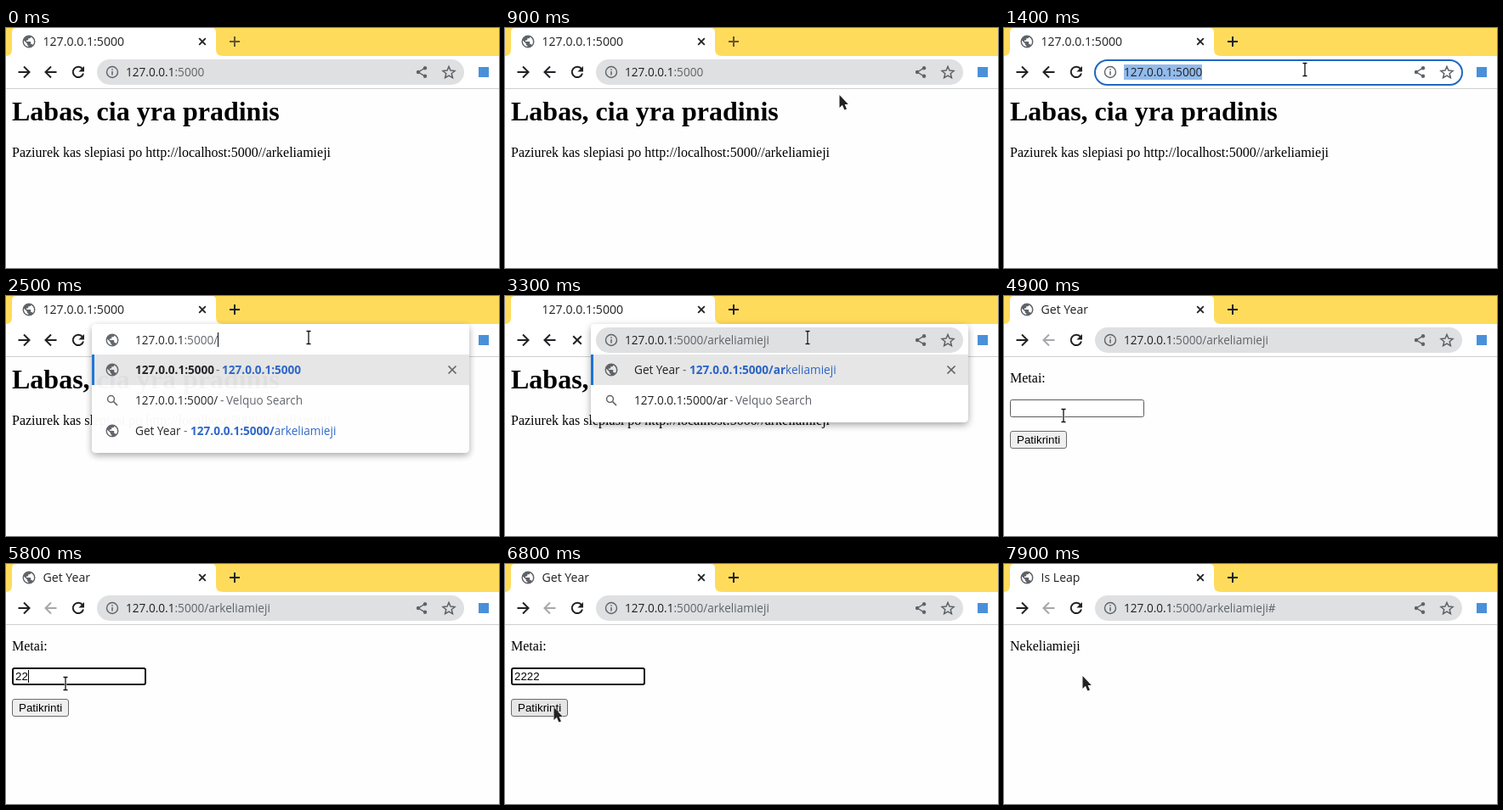
These frames come from a looping animation (580x283 px, 8 s). An HTML page:

```html
<!DOCTYPE html>
<html lang="lt">
<head>
<meta charset="utf-8">
<title>Keliamieji metai</title>
<style>
  html, body { margin: 0; width: 100%; height: 100%; overflow: hidden; background: #fefefe; }
  svg { display: block; width: 580px; height: 283px; }
  text { white-space: pre; }
  .ui { font: 13.6px "Open Sans", "Noto Sans", sans-serif; }
  .tab { font-size: 14.1px; }
  .bold { font-weight: 700; }
  .page { font: 16px "Liberation Serif", serif; fill: #000; }
  .head { font-size: 32px; font-weight: 700; }
  .form { font: 13.333px "Liberation Sans", Arial, sans-serif; fill: #000; }
</style>
</head>
<body>
<svg id="stage" viewBox="0 0 580 283" xmlns="http://www.w3.org/2000/svg"></svg>
<script>
const LOOP = 8000, STEP = 100;
const DARK = '#202124', GREY = '#5f6368', BLUE = '#2a64c5', SELECTED = '#92bbec';
const HOST = '127.0.0.1', PORT = ':5000', ADDRESS = HOST + PORT;

// Pointer stops: time, x, y
const POINTER = [
  [500, 471, 125], [1100, 354, 56], [1300, 354, 52], [1400, 354, 49], [1600, 356, 49],
  [3900, 356, 49], [4100, 251, 76], [4200, 251, 76], [4400, 83, 122], [4500, 83, 122],
  [4600, 58, 155], [4700, 58, 155], [4900, 70, 141], [6300, 70, 141], [6400, 70, 146],
  [6500, 70, 146], [6600, 57, 169], [7700, 57, 169], [7900, 92, 132]
];

const within = (t, from, to) => t >= from && t < to;
const rect = (x, y, w, h, fill, more = '') =>
  `<rect x="${x}" y="${y}" width="${w}" height="${h}" fill="${fill}" ${more}/>`;
const line = (d, color = DARK, width = 2, more = '') =>
  `<path d="${d}" fill="none" stroke="${color}" stroke-width="${width}" ${more}/>`;
const text = (x, y, content, cls = 'ui', fill = '') =>
  `<text x="${x}" y="${y}" class="${cls}"${fill && ` fill="${fill}"`}>${content}</text>`;
const span = (content, fill, bold, x) =>
  `<tspan fill="${fill}"${bold ? ' class="bold"' : ''}${x ? ` x="${x}"` : ''}>${content}</tspan>`;
const caret = (x, y, h) => rect(x, y, 1, h, '#000');

const globe = (x, y) => `<path transform="translate(${x - 9} ${y - 9}) scale(.75)" fill="${GREY}"
  d="M12 2a10 10 0 1 0 0 20a10 10 0 0 0 0-20zm-1 17.9c-4-.5-7-3.9-7-7.9 0-.6.1-1.2.2-1.8L9 15v1a2 2 0 0 0 2 2zm6.9-2.5a2 2 0 0 0-1.9-1.4h-1v-3a1 1 0 0 0-1-1H8v-2h2a1 1 0 0 0 1-1V7h2a2 2 0 0 0 2-2v-.4a8 8 0 0 1 2.9 12.8z"/>`;
const cross = (x, y, r, color = DARK, width = 1.8) =>
  line(`M${x - r} ${y - r}l${2 * r} ${2 * r}m0 ${-2 * r}l${-2 * r} ${2 * r}`, color, width);
const arrow = (x, dir, color) =>
  line(`M${x - 6.5 * dir} 52h${13 * dir}M${x} 45.5l${-6.5 * dir} 6.5l${6.5 * dir} 6.5`, color);
const lens = (x, y) => `<circle cx="${x - 1.5}" cy="${y - 1.5}" r="3.9" fill="none" stroke="${GREY}" stroke-width="1.5"/>`
  + line(`M${x + 1.5} ${y + 1.5}l4.5 4.5`, GREY, 1.7);
const info = () => `<circle cx="125" cy="52" r="6.5" fill="none" stroke="${GREY}" stroke-width="1.4"/>`
  + line('M125 51v4.5M125 48.2v1.5', GREY, 1.5);
const reload = () => line('M90 48.2A6.2 6.2 0 1 0 91 53.5')
  + `<path d="M92 45v6.6h-6.6z" fill="${DARK}"/>`;

const barIcons = () =>
  line('M493 47.2L485 52l8 4.8', GREY, 1.4)
  + [[493, 47.2], [485, 52], [493, 56.8]].map(([x, y]) =>
    `<circle cx="${x}" cy="${y}" r="2.2" fill="${GREY}"/>`).join('')
  + line('M521 45.5l2 4.6 5 .4-3.8 3.3 1.2 4.9-4.4-2.6-4.4 2.6 1.2-4.9-3.8-3.3 5-.4z', GREY, 1.5);

const pill = () => rect(107, 37, 432, 30, '#dee0e2', 'rx="15"');

const addressText = (x, path = '') =>
  `<text x="${x}" y="57" class="ui">${span(HOST, DARK)}${span(PORT + path, GREY)}</text>`;

function frame(t, view) {
  const focused = t >= 1300;
  const title = view === 'home' ? ADDRESS : view === 'form' ? 'Get Year' : 'Is Leap';
  const loading = within(t, 3300, 3500) || within(t, 7200, 7500);
  return rect(0, 0, 580, 33, '#ffdb5c')
    + '<path d="M0 33Q7 33 7 25V5Q7 0 12 0H242Q247 0 247 5V25Q247 33 255 33Z" fill="#fff"/>'
    + (loading ? '' : globe(27, 16))
    + text(43.5, 21, title, 'ui tab', DARK)
    + cross(231, 16, 3.8)
    + line('M263 16h12M269 10v12', focused ? DARK : '#65572b')
    + rect(0, 33, 580, 38, '#fff')
    + rect(0, 71, 580, 1, '#cfcfcf')
    + arrow(21, -1, DARK)
    + arrow(53, 1, view === 'home' ? DARK : '#a5a7aa')
    + (loading ? cross(85, 52, 4.8, DARK, 2) : reload())
    + rect(556, 46, 12, 12, '#4a90d9');
}

function page(t, view) {
  if (view === 'home') {
    return text(7, 109, 'Labas, cia yra pradinis', 'page head')
      + text(7, 152, 'Paziurek kas slepiasi po http://localhost:5000//arkeliamieji', 'page');
  }
  if (view === 'result') return text(7, 102, 'Nekeliamieji', 'page');

  const focused = within(t, 5000, 7100);
  const digits = [5400, 5700, 5900, 6200].filter(at => t >= at).length;
  const button = t >= 7100 ? '#f5f5f5' : t >= 6600 ? '#e5e5e5' : '#efefef';
  return text(7, 102, 'Metai:', 'page')
    + (focused
      ? rect(8, 123, 156, 19, '#fff', 'rx="2" stroke="#101010" stroke-width="2"')
      : rect(7.5, 122.5, 157, 20, '#fff', 'rx="2" stroke="#5c5c5c"'))
    + text(11, 137, '2'.repeat(digits), 'form')
    + (focused && t < 6800 ? caret(11 + Math.round(digits * 7.42), 125, 15) : '')
    + rect(7.5, 159.5, 66, 20, button, 'rx="2.5" stroke="#6b6b6b"')
    + text(15, 174, 'Patikrinti', 'form')
    + (within(t, 5000, 5800) ? suggestions(t) : '');
}

function suggestions(t) {
  return `<g opacity="${t >= 5700 ? .4 : 1}">`
    + rect(22, 148, 112, 80, '#fff', 'rx="4" filter="url(#shadow)"')
    + text(36, 175, '2020', 'ui', DARK) + text(36, 210, '2000', 'ui', DARK) + '</g>';
}

function addressBar(t, view) {
  if (within(t, 1300, 2500)) {
    const selected = t < 1600;
    return rect(107, 38, 432, 29, '#fff', 'rx="14.5" stroke="#1f68c1" stroke-width="2"')
      + info() + barIcons()
      + (selected ? rect(141, 43, 92, 18, SELECTED) + text(141, 57, ADDRESS, 'ui', DARK) : addressText(141))
      + (within(t, 1600, 2100) ? caret(232, 43, 17) : '');
  }
  const path = view === 'home' ? '' : view === 'form' ? '/arkeliamieji' : '/arkeliamieji#';
  return pill() + info() + barIcons() + addressText(141, path);
}

function dropdown(t) {
  const typed = t < 2600 ? '/' : '/ar';
  const rest = 'arkeliamieji'.slice(typed.length - 1);
  const row = (y, icon, ...spans) =>
    icon(125, y) + `<text x="152" y="${y + 5}" class="ui">${spans.join('')}</text>`;
  const yearRow = y => row(y, globe, span('Get Year', DARK), span('-', GREY, false, 209),
    span(ADDRESS + typed, BLUE, true, 217), span(rest, BLUE));
  const searchRow = x => row(123, lens, span(ADDRESS + typed, DARK),
    span('-', GREY, false, x), span('Velquo Search', GREY, false, x + 7));
  const homeRow = () => row(87, globe, span(ADDRESS, DARK, true),
    span('-', GREY, false, 247), span(ADDRESS, BLUE, true, 254));

  let bar;
  if (t < 2600) bar = globe(125, 52) + addressText(152, '/') + caret(249, 43, 17);
  else if (t < 3300) bar = globe(125, 52) + rect(262, 43, 60, 18, SELECTED) + addressText(152, '/arkeliamieji');
  else bar = pill() + info() + barIcons() + addressText(141, '/arkeliamieji');

  return `<g opacity="${t < 2600 ? .97 : 1}">`
    + rect(101, 33, 444, t < 2600 ? 152 : 116, '#fff', 'rx="5" filter="url(#shadow)"')
    + rect(101, 69, 444, 36, '#e6e6e6') + rect(101, 69, 3, 36, '#1a73d8')
    + cross(525, 87, 4.5, GREY, 1.7) + bar
    + (t < 2600 ? homeRow() + searchRow(252) + yearRow(159) : yearRow(87) + searchRow(264))
    + '</g>';
}

function pointer(t, view) {
  if (t < POINTER[0][0]) return '';
  const next = POINTER.findIndex(stop => stop[0] > t);
  const b = POINTER[next < 0 ? POINTER.length - 1 : next];
  const a = next < 0 ? b : POINTER[next - 1];
  const k = b === a ? 0 : (t - a[0]) / (b[0] - a[0]);
  const x = Math.round(a[1] + (b[1] - a[1]) * k);
  const y = Math.round(a[2] + (b[2] - a[2]) * k);
  const overText = y < 66 || (view === 'form' && y > 123 && y < 144);
  if (overText) {
    const beam = `M${x - 2.5} ${y - 7.5}h2l.5 .5.5-.5h2M${x} ${y - 7}v14M${x - 2.5} ${y + 7.5}h2l.5-.5.5 .5h2`;
    return line(beam, '#fff', 3, 'opacity=".8"') + line(beam, '#111', 1.3);
  }
  return `<path transform="translate(${x} ${y})" d="M.5 0V15l3.4-3.2L6.4 17.6l2.6-1.1L6.6 11H10.8Z"
    fill="#222" stroke="#fff" stroke-width="1" paint-order="stroke"/>`;
}

const DEFS = `<defs><filter id="shadow" x="-10%" y="-20%" width="120%" height="150%">
  <feDropShadow dx="0" dy="3" stdDeviation="4" flood-color="#000" flood-opacity=".35"/></filter></defs>`;

function scene(t) {
  const view = t < 3400 ? 'home' : t < 7300 ? 'form' : 'result';
  return DEFS + rect(0, 0, 580, 283, '#fefefe')
    + frame(t, view) + page(t, view)
    + (within(t, 2500, 3400) ? dropdown(t) : addressBar(t, view))
    + pointer(t, view);
}

const stage = document.getElementById('stage');
const start = performance.now();
let shown = -1;

function update() {
  const elapsed = Math.max(0, performance.now() - start) % LOOP;
  const t = Math.floor(elapsed / STEP) * STEP;
  if (t !== shown) stage.innerHTML = scene(shown = t);
  requestAnimationFrame(update);
}
update();
</script>
</body>
</html>
```
